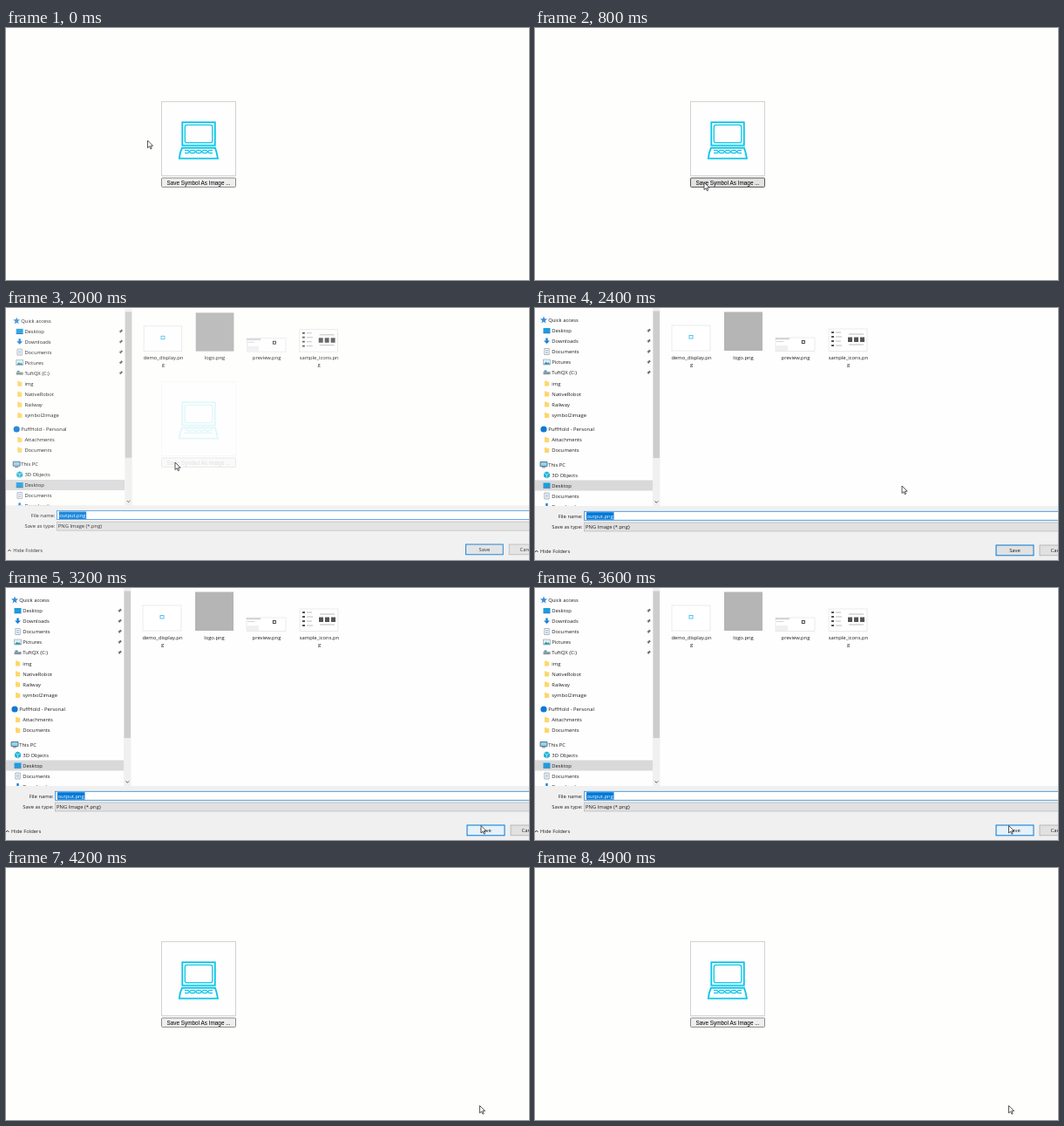
Recreate the animation shown at these times as an HTML page. Size 600x289 px, loop 5 s.

```html
<!DOCTYPE html>
<html lang="en">
<head>
<meta charset="utf-8">
<title>Save symbol as image</title>
<style>
html, body { margin: 0; width: 100%; height: 100%; overflow: hidden; background: #fefefc; }
svg { display: block; width: 600px; height: 289px; }
text { font: 5.85px "Open Sans", sans-serif; fill: #1c1c1c; }
#button text { font: 6.4px "Liberation Sans", Arial, sans-serif; fill: #000; }
#button rect { fill: #efefef; stroke: #8a8a8a; }
#button.hover rect { fill: #e3e3e3; stroke: #555; }
#button.active rect { fill: #ececec; stroke: #777; }
#save rect { fill: #e1e1e1; stroke: #0078d7; }
#save.hover rect { fill: #e5f1fb; }
.mid { text-anchor: middle; }
.end { text-anchor: end; }
.thumb { fill: #fff; stroke: #dcdcdc; stroke-width: .6; }
</style>
</head>
<body>
<svg viewBox="0 0 600 289">
  <defs>
    <path id="folder" d="M-2.5-3h2.2l.8 1h2.2v5h-5.2z" fill="#ffd66b"/>
    <g id="desktop"><path d="M-4-3h8v5.2h-8z" fill="#1b9de2"/><path d="M-4 2.2h8v1h-8z" fill="#0b6cae"/></g>
    <path id="downloads" d="M-1.2-3.5h2.4v3h2.3L0 3-3.5-.5h2.3z" fill="#1b82d6"/>
    <g id="documents"><path d="M-2.7-3.5h5.4v7h-5.4z" fill="#fff" stroke="#8796a3" stroke-width=".7"/><path d="M-1.5-1.5h3M-1.5 0h3M-1.5 1.5h3" stroke="#6b9ac4" stroke-width=".6"/></g>
    <g id="pictures"><path d="M-4-3h8v6h-8z" fill="#d9effb" stroke="#8a9aa5" stroke-width=".6"/><path d="M-3.6 2.7l2.6-3 1.8 1.6 1.2-1 1.7 2.4z" fill="#3d8f9c"/></g>
    <g id="drive"><path d="M-4-.8h8v3h-8z" fill="#8d9296"/><path d="M-3-2.5h3v1.5h-3z" fill="#1b9de2"/></g>
    <path id="star" d="M0-4l1.1 2.8 2.9.2-2.3 1.9.8 3L0 2.3-2.5 3.9l.8-3L-4-1l2.9-.2z" fill="#3a8fd6"/>
    <circle id="dot" r="3.6" fill="#0f78d4"/>
    <g id="pc"><path d="M-4-3h8v5h-8z" fill="#8fd3f5" stroke="#4b5a66" stroke-width=".8"/><path d="M-2 3.3h4" stroke="#4b5a66" stroke-width=".8"/></g>
    <g id="cube"><path d="M0-4l3.5 1.8v4.2L0 4l-3.5-2v-4.2z" fill="#24b4d6"/><path d="M-3.5-2.2L0-.4l3.5-1.8M0-.4V4" fill="none" stroke="#c9f1fa" stroke-width=".7"/></g>
    <path id="pin" d="M.5-2.5l2 2-1 .2-1.2 1.2-.1 1.2L-.9 1-2.5 2.6-1 .8l-1.2-1.2 1.2-.1L.2-1.7z" fill="#666"/>
  </defs>

  <rect x="178.5" y="84.5" width="85" height="85" fill="#fefefe" stroke="#d2d2d2"/>
  <g fill="none" stroke="#08c5e9" stroke-width="1.8">
    <path d="M202.3 108.2h37.5v26.4h-37.5zM202 137.5h38q1.8 5 3 12.2h-44.2q.6-7.2 3.2-12.2z"/>
    <rect x="205.3" y="111.2" width="31.5" height="20.5" rx="2.5" stroke-width="1.3"/>
    <path d="M205 140.4h4l3 3h4l3-3h4l3 3h4l3-3h4M205 143.4h4l3-3h4l3 3h4l3-3h4l3 3h4" stroke-width="1.1"/>
  </g>
  <g id="button">
    <rect x="178.5" y="172" width="85" height="10.4" rx=".8"/>
    <text class="mid" x="221" y="179.5">Save Symbol As Image ...</text>
  </g>

  <g id="dialog">
    <rect x="-6" y="-3" width="660" height="294" fill="#fefefe" stroke="#ddd" stroke-width=".6"/>
    <path d="M-6 197.5H135v12H-6z" fill="#d9d9d9"/>
    <path d="M135 0h8.5v227H135z" fill="#f0f0f0"/>
    <path d="M135.5 3.5h7.5v168.500h-7.5z" fill="#cdcdcd"/>
    <path d="M137.5 221.5l1.8 1.8 1.8-1.8" fill="none" stroke="#444" stroke-width=".9"/>
    <g id="tree"></g>

    <rect class="thumb" x="157" y="20" width="44" height="29"/>
    <rect x="177" y="31.500" width="4" height="3.500" fill="none" stroke="#42bdec" stroke-width=".9"/>
    <rect x="217" y="4.500" width="44" height="44.500" fill="#b5b5b5"/>
    <rect class="thumb" x="276" y="34" width="45" height="15.500"/>
    <path d="M276 34.500h16v1.500h-16zM277 38h8v.8h-8z" fill="#c8c8cf"/>
    <path d="M276 43h14v6h-14z" fill="#f0f0f2"/>
    <rect x="306.300" y="37.500" width="3" height="3" fill="none" stroke="#333" stroke-width=".9"/>
    <rect class="thumb" x="337" y="24" width="44" height="25.500"/>
    <path d="M340 28h3M340 33h3M340 38h3M340 43h3" stroke="#555" stroke-width="1.800"/>
    <path d="M345 28h6M345 33h7M345 38h6M345 43h7M360 30h17M360 42h17" stroke="#aaa" stroke-width=".8"/>
    <path d="M359 33.500h5v5.500h-5zM366 33.500h5v5.500h-5zM373 33.500h5v5.500h-5z" fill="#555"/>
    <g id="files"></g>

    <path d="M-6 227H654v64H-6z" fill="#f0f0f0"/>
    <text class="end" x="54.500" y="241">File name:</text>
    <text class="end" x="54.500" y="253">Save as type:</text>
    <rect x="56.500" y="233.300" width="570" height="10" fill="#fff" stroke="#2a8bdc" stroke-width=".8"/>
    <path d="M59 234.200h31.500v8.500H59z" fill="#0078d7"/>
    <text x="59.500" y="240.500" style="fill:#fff">output.png</text>
    <rect x="56.500" y="246" width="570" height="10" fill="#e1e1e1" stroke="#b5b5b5" stroke-width=".7"/>
    <text x="58" y="253">PNG Image (*.png)</text>
    <path d="M0 280l1.700-1.900 1.700 1.900" fill="none" stroke="#222" stroke-width=".9"/>
    <text x="6" y="281.200">Hide Folders</text>
    <g id="save">
      <rect x="529" y="272" width="43" height="11.800"/>
      <text class="mid" x="550.500" y="280.200">Save</text>
    </g>
    <rect x="579" y="272" width="43" height="11.800" fill="#e1e1e1" stroke="#adadad" stroke-width=".8"/>
    <text class="mid" x="600.500" y="280.200">Cancel</text>
  </g>

  <path id="cursor" d="M0 0v8.500l2-1.800 1.400 3 1.300-.6-1.400-2.900h2.800z" fill="#fff" stroke="#222" stroke-width=".75"/>
</svg>
<script>
const $ = id => document.getElementById(id);

// Sidebar: centre y, icon, label, indent level, pinned
const rows = [
  [13.5, 'star', 'Quick access', 0],
  [26, 'desktop', 'Desktop', 1, 1],
  [38, 'downloads', 'Downloads', 1, 1],
  [50, 'documents', 'Documents', 1, 1],
  [62, 'pictures', 'Pictures', 1, 1],
  [74, 'drive', 'TuftQX (C:)', 1, 1],
  [86.5, 'folder', 'img', 1],
  [98.5, 'folder', 'NativeRobot', 1],
  [110.5, 'folder', 'Railway', 1],
  [123, 'folder', 'symbol2image', 1],
  [139, 'dot', 'PuffHold - Personal', 0],
  [151, 'folder', 'Attachments', 1],
  [163, 'folder', 'Documents', 1],
  [179.5, 'pc', 'This PC', 0],
  [191.5, 'cube', '3D Objects', 1],
  [203.5, 'desktop', 'Desktop', 1],
  [215.5, 'documents', 'Documents', 1],
  [227.5, 'downloads', 'Downloads', 1]
];
$('tree').innerHTML = rows.map(([y, icon, label, level, pinned]) =>
  `<use href="#${icon}" x="${level ? 13.5 : 10}" y="${y}"/>
   <text x="${level ? 19.3 : 15.2}" y="${y + 2.2}">${label}</text>` +
  (pinned ? `<use href="#pin" x="130.500" y="${y}"/>` : '')).join('');

const files = [[179.5, 'demo_display.pn', 'g'], [239, 'logo.png'], [299, 'preview.png'], [359.5, 'sample_icons.pn', 'g']];
$('files').innerHTML = files.map(([x, ...lines]) => lines.map((line, i) =>
  `<text class="mid" x="${x}" y="${58.5 + i * 8}">${line}</text>`).join('')).join('');

// Keyframes: time, then values
const pointer = [[0, 162.5, 129], [600, 194, 177], [2100, 194, 177], [2400, 421, 204],
  [2700, 545, 272.5], [3300, 545, 272.5], [3600, 543.5, 272.5]];
const fade = [[1800, 0, .94], [1900, .35, .965], [2000, .88, .993], [2100, 1, 1],
  [3600, 1, 1], [3700, .72, .986], [3800, .28, .967], [3900, 0, .95]];

function sample(keys, t) {
  const next = keys.findIndex(key => key[0] > t);
  if (next === 0) return keys[0].slice(1);
  if (next < 0) return keys.at(-1).slice(1);
  const a = keys[next - 1], b = keys[next];
  const u = (t - a[0]) / (b[0] - a[0]);
  return a.slice(1).map((v, i) => v + (b[i + 1] - v) * u);
}

function draw(now) {
  const t = Math.floor(now % 5000 / 100) * 100;
  const [x, y] = sample(pointer, t);
  const [opacity, scale] = sample(fade, t);
  $('cursor').setAttribute('transform', `translate(${x} ${y})`);
  $('dialog').setAttribute('opacity', opacity);
  $('dialog').setAttribute('transform', `translate(319 137) scale(${scale}) translate(-319 -137)`);
  $('button').setAttribute('class', t === 1300 ? 'active' : t >= 600 && t < 4000 ? 'hover' : '');
  $('save').setAttribute('class', t >= 2700 ? 'hover' : '');
  requestAnimationFrame(draw);
}
draw(performance.now());
</script>
</body>
</html>
```
